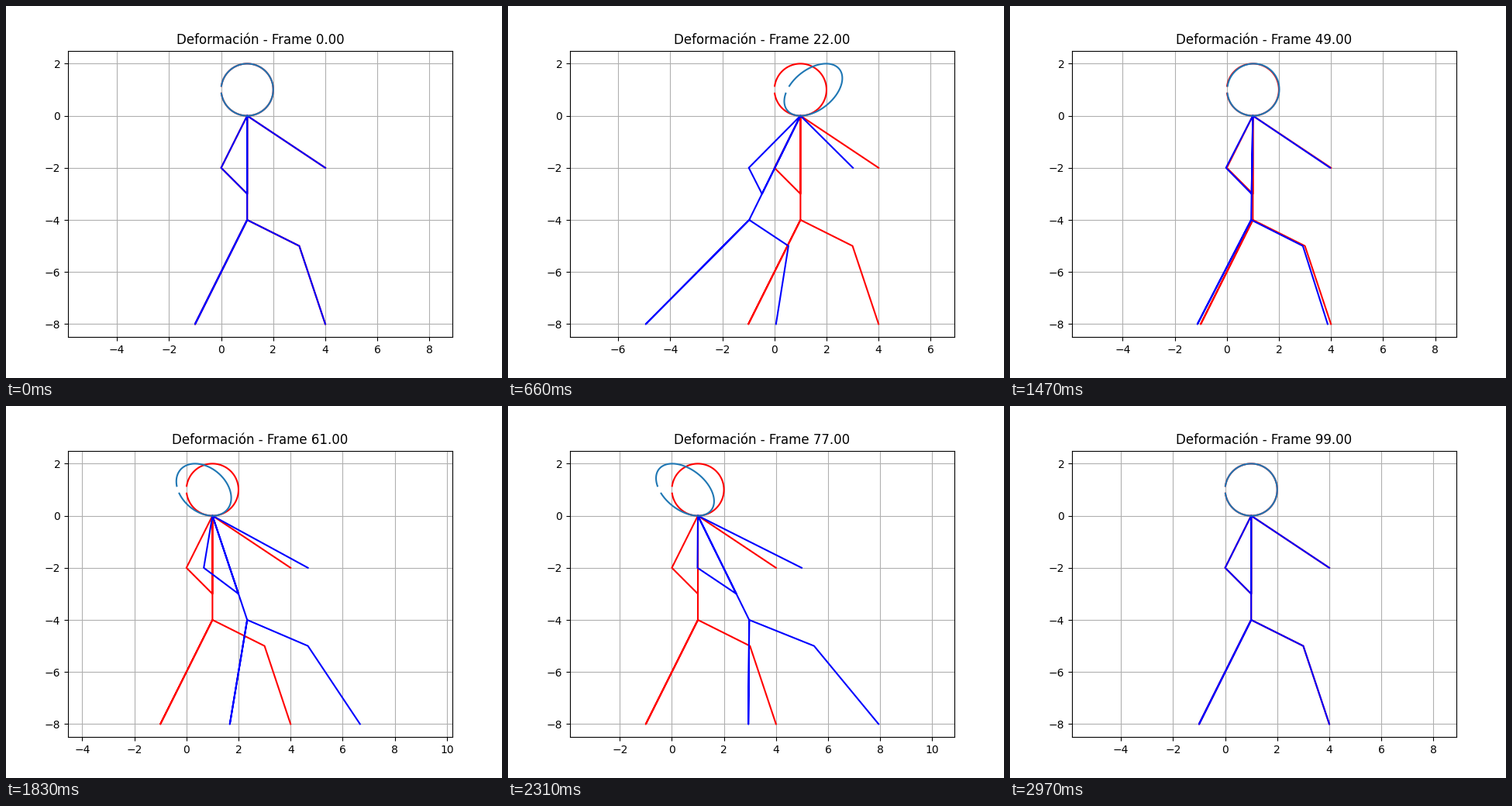
A matplotlib script that plays this animation: 640 px wide and 480 px high, repeating every 3000 ms.

```python
import numpy as np
import matplotlib.pyplot as plt
from matplotlib.animation import FuncAnimation

FRAMES = 100
Y_MIN, Y_MAX = -8.5, 2.5

# Stick figure as one stroke, starting at the right hand
body = np.array([(4, -2), (1, 0), (0, -2), (1, -3), (1, 0), (1, -4),
                 (-1, -8), (1, -4), (3, -5), (4, -8)], dtype=float).T

# Head: circle left slightly open on its left side
theta = np.linspace(-3, 3, 400)
head = np.array([1 + np.cos(theta), 1 + np.sin(theta)])

shear = 0.5 * np.sin(np.linspace(0, 2 * np.pi, FRAMES))

fig, ax = plt.subplots(figsize=(6.4, 4.8), dpi=100)
ax.grid(True)
ax.set_ylim(Y_MIN, Y_MAX)

ax.plot(*body, color="red")
ax.plot(*head, color="red")
moving_body, = ax.plot(*body, color="blue")
moving_head, = ax.plot(*head, color="C0")
title = ax.set_title("")

# Half the visible width that keeps both axes at the same scale
box = ax.get_position()
half_width = (Y_MAX - Y_MIN) * (box.width * 6.4) / (box.height * 4.8) / 2


def deform(points, k):
    x, y = points
    return x + k * y, y


def update(i):
    k = shear[i]
    moving_body.set_data(*deform(body, k))
    moving_head.set_data(*deform(head, k))
    center = 1.5 - 4 * k
    ax.set_xlim(center - half_width, center + half_width)
    title.set_text(f"Deformación - Frame {i:.2f}")
    return moving_body, moving_head, title


anim = FuncAnimation(fig, update, frames=FRAMES, interval=30,
                     blit=False, repeat=True, repeat_delay=0)
plt.show()
```
